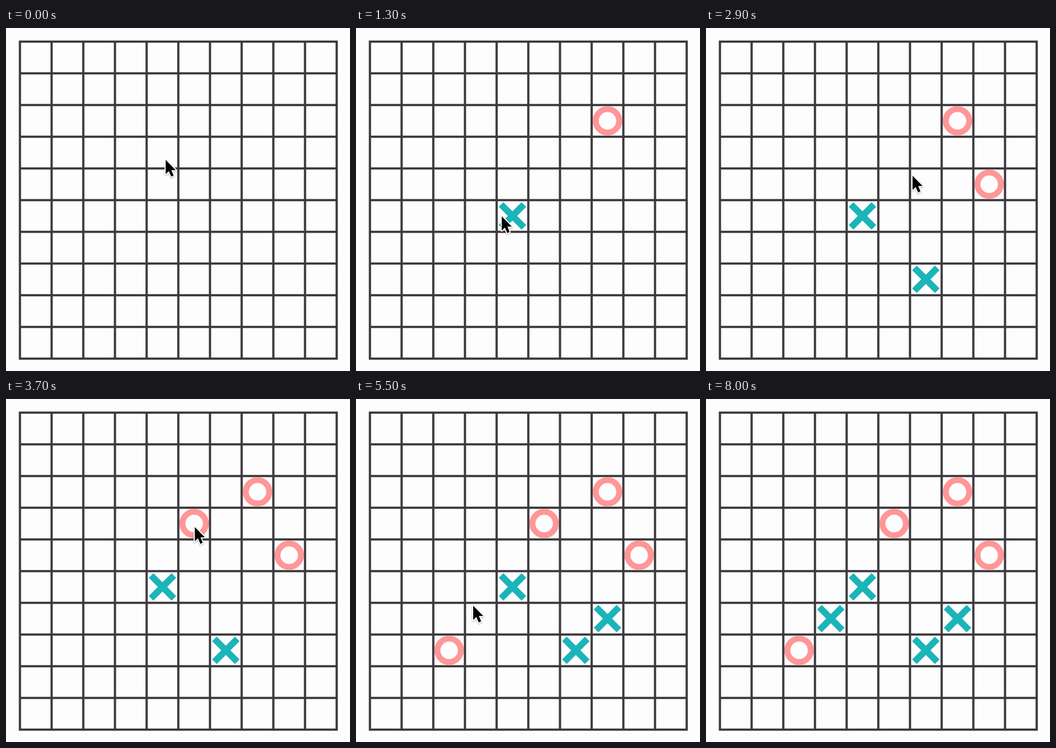
An HTML page that plays this animation: 543 px wide and 541 px high, repeating every 8300 ms.

```html
<!DOCTYPE html>
<html lang="en">
<head>
<meta charset="utf-8">
<title>Grid game</title>
<style>
  html, body { margin: 0; width: 100%; height: 100%; overflow: hidden; background: #fefdfe; }
  svg { display: block; width: 100vw; height: 100vh; }
  #grid { stroke: #3b393c; stroke-width: 3.5; fill: none; stroke-linecap: square; }
  .o { stroke: #ff9697; stroke-width: 9.4; fill: none; }
  .x { stroke: #1bb4b8; stroke-width: 10.4; fill: none; }
  #cursor { filter: drop-shadow(0 1px 1px rgba(0, 0, 0, .3)); }
</style>
</head>
<body>
<svg viewBox="0 0 543 541">
  <path id="grid"/>
  <g id="marks"></g>
  <g id="cursor">
    <path d="M0 0V22.5L5 17.8L8.8 26.4L12.6 24.8L9 16.3H16Z"
      fill="#000" stroke="#fff" stroke-width="3.4" stroke-linejoin="round" paint-order="stroke"/>
  </g>
</svg>
<script>
const LOOP = 8300, TICK = 100, CELL = 50, LEFT = 22, TOP = 21.4, N = 10;

// Pointer stops: arrive, leave, x, y and the mark clicked there, one tick before leaving
const stops = [
  [0, 0, 252, 208],
  [400, 600, 402, 152, 'o'],
  [1100, 1400, 230, 297, 'x'],
  [1900, 2100, 444, 264, 'o'],
  [2400, 2700, 361, 391, 'x'],
  [2900, 2900, 326, 233],
  [3100, 3300, 235, 209],
  [3600, 3800, 298, 202, 'o'],
  [4100, 4200, 421, 323, 'x'],
  [4500, 4900, 160, 375, 'o'],
  [5200, 5200, 400, 277],
  [5500, 5800, 185, 326, 'x'],
  [6100, 6100, 434, 264],
  [6400, 6700, 182, 488],
  [7000, 7800, 434, 264],
  [7900, 8000, 227, 367]
];
const end = stops[stops.length - 1][1];

const $ = id => document.getElementById(id);
const smooth = u => u * u * (3 - 2 * u);
const mid = (v, origin) => origin + CELL * (Math.floor((v - origin) / CELL) + .5);

// A mark fills the cell under the pointer
function mark([, leave, px, py, kind]) {
  const x = mid(px, LEFT), y = mid(py, TOP), r = 18.5, d = 18;
  const el = document.createElementNS('http://www.w3.org/2000/svg', 'path');
  el.setAttribute('class', kind);
  el.setAttribute('d', kind === 'x'
    ? `M${x - d} ${y - d}l${2 * d} ${2 * d}m0 ${-2 * d}l${-2 * d} ${2 * d}`
    : `M${x - r} ${y}a${r} ${r} 0 1 1 ${2 * r} 0a${r} ${r} 0 1 1 ${-2 * r} 0Z`);
  $('marks').append(el);
  return { at: leave - TICK, el };
}

function tip(t) {
  const i = stops.findLastIndex(s => s[0] <= t);
  const [, leave, x, y] = stops[i];
  if (t <= leave || i === stops.length - 1) return [x, y];
  const [arrive, , nx, ny] = stops[i + 1];
  const u = smooth((t - leave) / (arrive - leave));
  return [x + (nx - x) * u, y + (ny - y) * u];
}

let lines = '';
for (let i = 0; i <= N; i++) {
  lines += `M${LEFT + i * CELL} ${TOP}v${N * CELL}M${LEFT} ${TOP + i * CELL}h${N * CELL}`;
}
$('grid').setAttribute('d', lines);
const marks = stops.filter(s => s[4]).map(mark);

function draw(now) {
  const t = Math.floor((now % LOOP) / TICK) * TICK;
  for (const { at, el } of marks) el.style.display = t >= at ? '' : 'none';
  $('cursor').style.display = t < end ? '' : 'none';
  $('cursor').setAttribute('transform', `translate(${tip(t)})`);
}

const start = performance.now();
function frame() {
  draw(performance.now() - start);
  requestAnimationFrame(frame);
}
frame();
</script>
</body>
</html>
```
